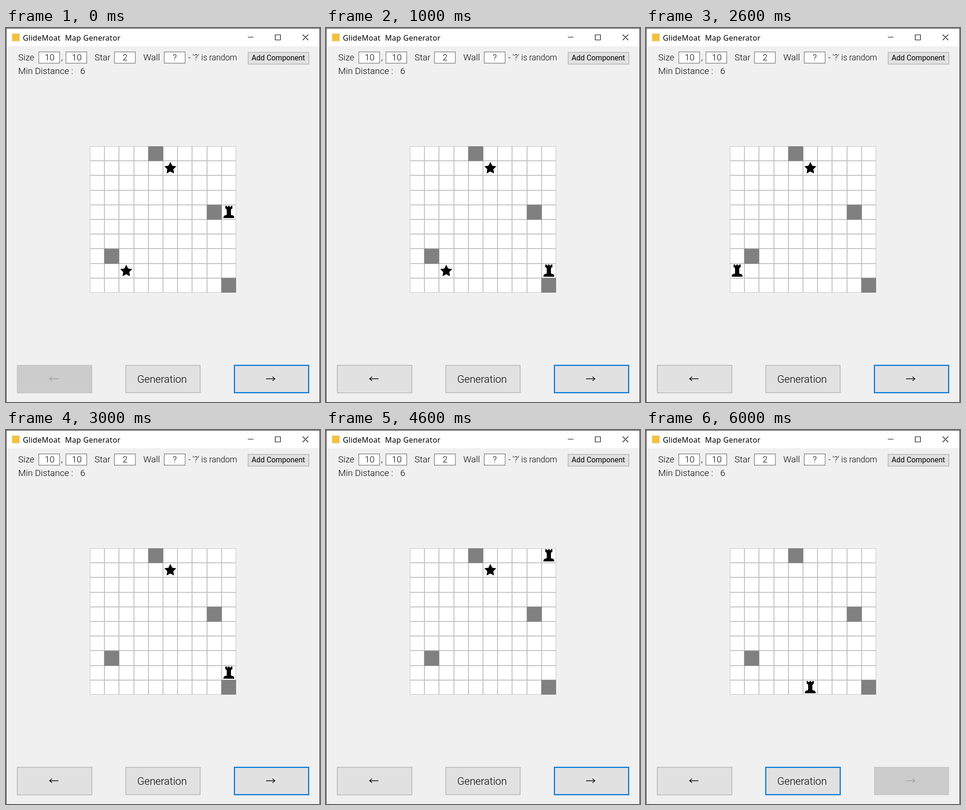
These frames come from a looping animation (670x797 px, 7000 ms). An HTML page:

```html
<!DOCTYPE html>
<html lang="en">
<head>
<meta charset="utf-8">
<title>GlideMoat Map Generator</title>
<style>
  html, body { margin: 0; width: 100%; height: 100%; overflow: hidden; background: #f0f0f0; }
  svg { display: block; width: 670px; height: 797px; }
  text { font: 300 19px Roboto, sans-serif; fill: #000; }
  .title { font: 16px "Noto Sans", sans-serif; letter-spacing: .3px; }
  .hint { font-size: 17.5px; }
  .small { font-size: 15.8px; font-weight: 400; }
  .large { font-size: 22.2px; }
  .mid { text-anchor: middle; }
  .glyph { fill: none; stroke: #000; stroke-width: 1.2; }
  .field { fill: #fff; stroke: #7a7a7a; stroke-width: 1.3; }
  .btn { fill: #e1e1e1; stroke: #adadad; stroke-width: 1.3; }
  .arrow { fill: none; stroke: #000; stroke-width: 1.4; }
  .wall { fill: #808080; }
  .star path { fill: #fff200; stroke: #fff200; stroke-width: 2.6; stroke-linejoin: round; }

  #rook, #starA, #starB, #prev, #prevArrow, #gen, #next, #nextArrow {
    animation: 7000ms step-end infinite;
  }
  #rook { animation-name: moves; }
  #starA { animation-name: takeLast; }
  #starB { animation-name: takeFirst; }
  #prev { animation-name: prevBox; }
  #prevArrow { animation-name: prevInk; }
  #gen { animation-name: genBox; }
  #next { animation-name: nextBox; }
  #nextArrow { animation-name: nextInk; }

  @keyframes moves {
    0% { transform: translate(460px, 377px); }
    14.2857% { transform: translate(460px, 502px); }
    28.5714% { transform: translate(179px, 502px); }
    42.8571% { transform: translate(460px, 502px); }
    57.1428% { transform: translate(460px, 252px); }
    71.4285% { transform: translate(335px, 252px); }
    85.7142%, 100% { transform: translate(335px, 533px); }
  }
  @keyframes takeFirst { 0% { opacity: 1; } 28.5714%, 100% { opacity: 0; } }
  @keyframes takeLast { 0% { opacity: 1; } 85.7142%, 100% { opacity: 0; } }
  @keyframes prevBox {
    0% { fill: #ccc; stroke: #bfbfbf; }
    14.2857%, 100% { fill: #e1e1e1; stroke: #adadad; }
  }
  @keyframes prevInk { 0% { stroke: #a0a0a0; } 14.2857%, 100% { stroke: #000; } }
  @keyframes genBox {
    0% { stroke: #adadad; stroke-width: 1.3px; }
    85.7142%, 100% { stroke: #0078d7; stroke-width: 2.4px; }
  }
  @keyframes nextBox {
    0% { fill: #e1e1e1; stroke: #0078d7; stroke-width: 2.4px; }
    85.7142%, 100% { fill: #ccc; stroke: #bfbfbf; stroke-width: 1.3px; }
  }
  @keyframes nextInk { 0% { stroke: #000; } 85.7142%, 100% { stroke: #a0a0a0; } }
</style>
</head>
<body>
<svg viewBox="0 0 670 797">
  <defs>
    <clipPath id="board"><rect x="179" y="252" width="312" height="312"/></clipPath>
    <path id="star" d="M15.6 2.5 19.6 10.5 28.4 11.8 22.1 18.1 23.5 26.9 15.6 22.8 7.7 26.9 9.1 18.1 2.8 11.8 11.6 10.5Z"/>
  </defs>

  <rect width="670" height="797" fill="#f0f0f0"/>
  <rect width="670" height="39" fill="#fff"/>
  <path d="M.5 797V.5h669V797" fill="none" stroke="#1a1a1a"/>
  <rect x="13" y="12" width="16" height="16" fill="#f0c040"/>
  <text class="title" y="27"><tspan x="36">GlideMoat</tspan> <tspan x="126">Map Generator</tspan></text>
  <path class="glyph" d="M516 19.5h12M574.5 14.5h11v11h-11zM633 14l12 12m0-12l-12 12"/>

  <text x="26" y="69">Size</text>
  <rect class="field" x="70" y="51" width="44.5" height="24"/>
  <text class="mid" x="93" y="69">10</text>
  <text x="117.5" y="69">,</text>
  <rect class="field" x="127.8" y="51" width="44.5" height="24"/>
  <text class="mid" x="151" y="69">10</text>
  <text x="189" y="69">Star</text>
  <rect class="field" x="231.5" y="51" width="44.5" height="24"/>
  <text class="mid" x="254" y="69">2</text>
  <text x="293" y="69">Wall</text>
  <rect class="field" x="337.7" y="51" width="44.5" height="24"/>
  <text class="mid" x="360" y="69">?</text>
  <text class="hint" x="389" y="69">- '?' is random</text>
  <rect class="btn" x="516.6" y="52" width="129.6" height="25"/>
  <text class="small mid" x="581" y="69">Add Component</text>
  <text y="98"><tspan x="26">Min Distance :</tspan> <tspan x="158.5">6</tspan></text>

  <g clip-path="url(#board)">
    <rect x="179" y="252" width="312" height="312" fill="#fff"/>
    <path id="grid" fill="none" stroke="#c3c3c3" stroke-width="2"/>
    <rect class="wall" x="303.5" y="251.5" width="32" height="32"/>
    <rect class="wall" x="428.5" y="376.5" width="32" height="32"/>
    <rect class="wall" x="209.5" y="470.5" width="32" height="32"/>
    <rect class="wall" x="459.5" y="532.5" width="32" height="32"/>
  </g>
  <g class="star" id="starA"><use href="#star" x="335" y="283"/></g>
  <g class="star" id="starB"><use href="#star" x="241" y="502"/></g>
  <path id="rook" d="M8 2h3v2h3v-2h3v2h3v-2h3v6h-2v2h-1v11h1v1h3v1h2v2h1v3h-23v-3h1v-2h2v-1h3v-1h1v-11h-1v-2h-2z"/>

  <rect class="btn" id="prev" x="24" y="718.7" width="159.3" height="58.8"/>
  <path class="arrow" id="prevArrow" d="M112 747.5H93m5.5-4.5l-5.5 4.5 5.5 4.5"/>
  <rect class="btn" id="gen" x="255.6" y="718.9" width="158.8" height="58.2"/>
  <text class="large mid" x="333" y="755.5">Generation</text>
  <rect class="btn" id="next" x="487.4" y="718.9" width="158.4" height="58.2"/>
  <path class="arrow" id="nextArrow" d="M555 747.5h19m-5.5-4.5l5.5 4.5-5.5 4.5"/>
</svg>
<script>
  let lines = "";
  for (let i = 0; i <= 10; i++) {
    const step = Math.round(i * 31.2);
    lines += `M${179 + step} 252v312M179 ${252 + step}h312`;
  }
  document.getElementById("grid").setAttribute("d", lines);
</script>
</body>
</html>
```
